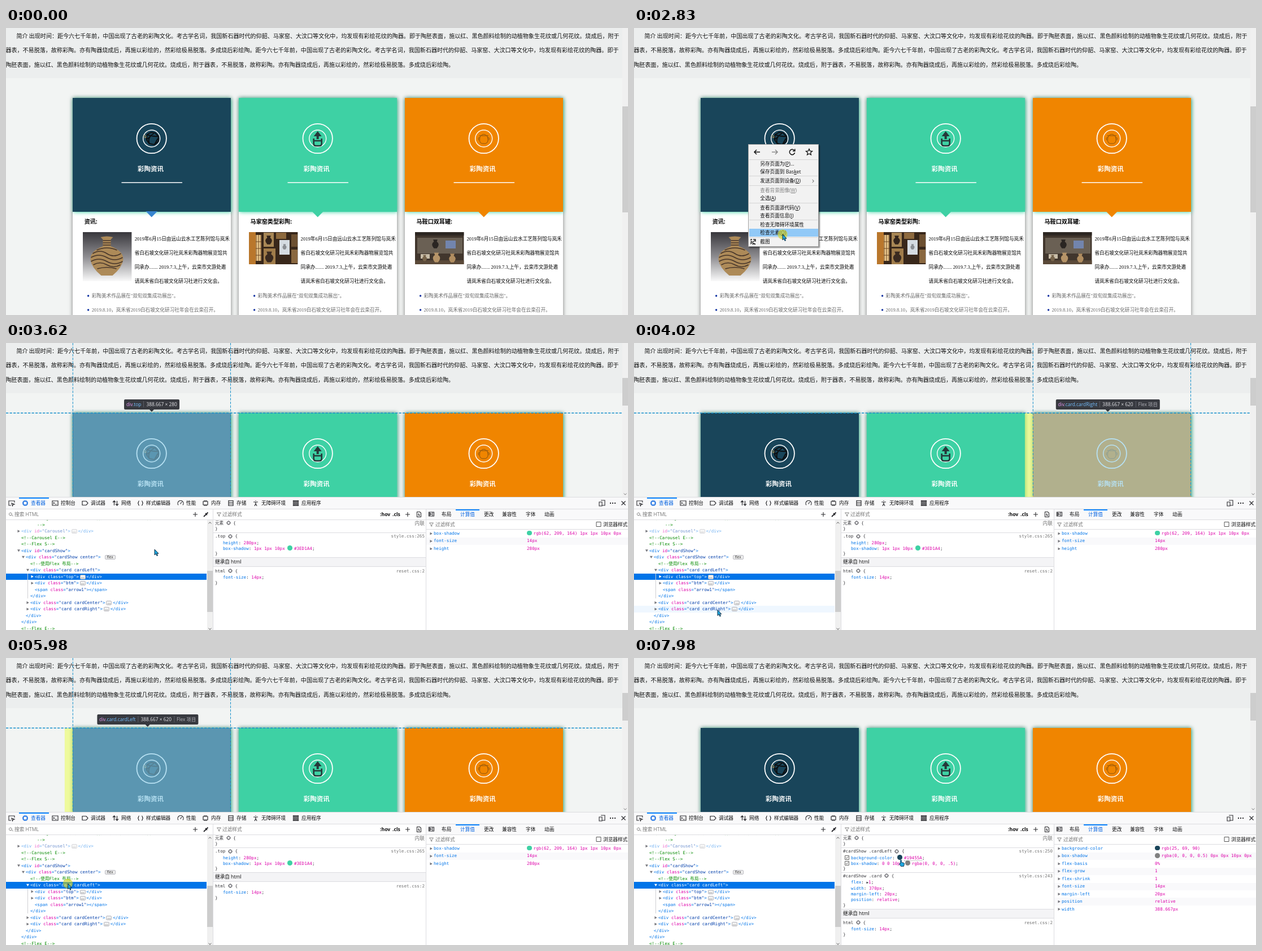
These frames come from a looping animation (1101x509 px, 8 s). An HTML page:

```html
<!DOCTYPE html>
<html lang="zh-CN">
<head>
<meta charset="utf-8">
<title>彩陶资讯</title>
<style>
html, body { margin: 0; width: 100%; height: 100%; overflow: hidden; background: #f2f4f3; }
[hidden] { display: none !important; }
#stage { position: absolute; left: 0; top: 0; width: 1101px; height: 509px; overflow: hidden;
  font: 8.64px "Open Sans", "Noto Sans CJK SC", sans-serif; color: #0c0c0d; text-spacing-trim: space-all; }
#stage div, #stage svg { position: absolute; }
.layer { left: 0; top: 0; width: 1101px; height: 509px; overflow: hidden; }
p { position: absolute; margin: 0; line-height: 12px; white-space: pre; }
i { font-style: normal; }
svg { fill: none; overflow: visible; }

.intro { font: 10.06px/12px "Noto Sans CJK SC", sans-serif; color: #111; }
.card { top: 124px; width: 279.8px; height: 446px; background: #fff; box-shadow: 0 0 7px rgba(0,0,0,.5); }
.head { width: 279.8px; height: 201.6px; background: var(--c); box-shadow: .7px .7px 7px #3ed1a4; }
.title { font-size: 11.52px; font-weight: 700; color: #fff; }
.sub { font-size: 10.08px; font-weight: 700; color: #000; }
.txt { font-family: "Liberation Serif", "Noto Sans CJK SC", serif; color: #000; }
.li { font-family: "Liberation Serif", "Noto Sans CJK SC", serif; color: #666; }

#menu { left: 202px; top: 206px; width: 123px; height: 180px; background: #f2f2f2;
  border: 1px solid #a3a3a3; box-shadow: 2px 2px 2px rgba(0,0,0,.45); }
#menu u { text-underline-offset: 1px; }
.hit { left: 1px; width: 122px; height: 14px; background: #91c9f7; }
.off { color: #7d7d7d; }
.rule { height: 1px; background: #d7d7db; }

.mono, .row p { font: 7.6px/12px "DejaVu Sans Mono", "Noto Sans CJK SC", monospace; color: #38383d; }
.t { color: #0074e8; } .a { color: #dd00a9; } .v { color: #003eaa; } .c { color: #058b00; }
.g { color: #737373; } .blue { color: #0060df; }
.row { left: 0; width: 355px; height: 11.5px; }
.row.hov { background: #eff7ff; }
.row.sel { background: #0074e8; }
.row.sel i { color: #fff; }
.row.sel em { background: #fff; }
em { position: absolute; width: 5px; height: 5px; background: #77777c; clip-path: polygon(10% 0, 95% 50%, 10% 100%); }
em.open { clip-path: polygon(0 10%, 100% 10%, 50% 95%); }
.dots, .flex { display: inline-block; box-sizing: border-box; height: 8px; margin: 0 1.8px; border: 1px solid #b9b9c0;
  border-radius: 2px; background: #eee; color: #333; font: 6px/5px "Open Sans", sans-serif; text-align: center; vertical-align: 0; }
.dots { width: 10px; font-size: 8px; line-height: 3px; }
.flex { margin-left: 7px; width: 19px; font-size: 6.6px; }
.sw { display: inline-block; width: 8.6px; height: 8.6px; margin-right: 3px; border-radius: 50%; vertical-align: -1.4px; }
#stage .gear { position: static; vertical-align: -1.5px; }
.tip { height: 18px; line-height: 18px; padding: 0 4px; border-radius: 2px; font-size: 8.4px; color: #e4e4e8;
  background: rgba(50,52,58,.97); white-space: pre; transform: translateX(-50%); }
.tip b { font-weight: 400; border-left: 1px solid #5c5e66; margin-left: 4px; padding-left: 4px; }
</style>
</head>
<body>
<div id="stage">
  <div id="page" class="layer"></div>
  <div id="over" class="layer" style="height:273px"></div>
  <div id="bar" style="left:1091px;top:0;width:10px;height:509px;background:#f0f0f0"><div id="thumb" style="width:10px;background:#cdcdcd"></div></div>
  <div id="menu"></div>
  <div id="panel" class="layer"></div>
  <svg id="cursor" width="1" height="1" style="left:0;top:0">
    <circle id="glow" r="8.7" fill="rgba(215,215,20,.58)"/>
    <path id="arrow" d="M0 0V10L2.4 7.8 4 11.5 5.6 10.8 4 7.3H7Z" fill="#1fa8e0" stroke="#0c2035" stroke-width=".9"/>
    <path id="hand" d="M-1 1Q0-1 1 1V4.5L5 5.3Q6 5.6 6 7L5 11.5H0L-3 7.5Q-3 6-1 7Z" fill="#1fa8e0" stroke="#0c2035" stroke-width=".8"/>
  </svg>
</div>
<script>
const $ = id => document.getElementById(id);
const text = (x, y, s, c = '') => `<p class="${c}" style="left:${x}px;top:${y - 6}px">${s}</p>`;
const box = (x, y, w, h, bg) => `<div style="left:${x}px;top:${y}px;width:${w}px;height:${h}px;background:${bg}"></div>`;
const path = (x, y, d, s = '#2a2a2e', w = 1.1, f = 'none') =>
  `<path transform="translate(${x} ${y})" d="${d}" stroke="${s}" stroke-width="${w}" fill="${f}"/>`;
const svg = (x, y, w, h, s) => `<svg style="left:${x}px;top:${y}px" width="${w}" height="${h}">${s}</svg>`;
const rect = (x, y, w, h, f) => `<rect x="${x}" y="${y}" width="${w}" height="${h}" fill="${f}"/>`;

// ---- page ----
const lead = '距今六七千年前，中国出现了古老的彩陶文化。考古学名词，我国新石器时代的仰韶、马家窑、大汶口等文化中，均发现有彩绘花纹的陶器。即于';
const made = '陶胚表面，施以红、黑色颜料绘制的动植物象生花纹或几何花纹。烧成后，附于';
const tail = '器表，不易脱落，故称彩陶。亦有陶器烧成后，再施以彩绘的，然彩绘极易脱落。多成烧后彩绘陶。';

const body = [
  '2019年6月15日由远山云水工艺陈列馆与岚禾',
  '省白石坡文化研习社岚禾彩陶器物展览馆共',
  '同承办....... 2019.7.3,上午，云栾市文游处邀',
  '请岚禾省白石坡文化研习社进行文化会。'
];
const news = ['彩陶美术作品展在"双旬双集成功展出"。', '2019.8.10，岚禾省2019白石坡文化研习社年会在云栾召开。'];

const jar = (x, y, s, f) => path(x, y, `M${-3*s}${-6*s}H${3*s}L${2*s} ${-3*s}Q${7*s} 0 ${2*s} ${6*s}H${-2*s}Q${-7*s} 0 ${-2*s} ${-3*s}Z`, 'none', 0, f);
const photos = [
  `<linearGradient id="wall" x2="0" y2="1"><stop stop-color="#38373c"/><stop offset=".5" stop-color="#8d8c90"/><stop offset="1" stop-color="#fafafa"/></linearGradient>` +
  rect(0, 0, 86.4, 87, 'url(#wall)') +
  path(42.5, 0, 'M-11 9Q0 6 11 9L7 13V25Q30 34 29 49Q27 63 10 77H-10Q-27 63-29 49Q-30 34-7 25V13Z', 'none', 0, '#ad8a58') +
  path(42.5, 0, 'M-7 15H7M-7 19H7M-7 23H7M-18 32Q0 24 18 32M-25 38Q-12 30 0 38T25 38M-28 45Q-14 37 0 45T28 45M-28 52Q-14 44 0 52T28 52M-24 58Q-12 51 0 58T24 58M-17 65Q0 60 17 65', '#46352a', 1.7),
  rect(0, 0, 86.4, 57, '#38271a') + rect(0, 0, 12, 57, '#b9772c') + rect(12, 5, 10, 46, '#e9c78c') +
  path(17, 5, 'M-4 0V46M0 0V46M4 0V46M-5 12H5M-5 24H5M-5 36H5', '#6b4520', 1) +
  rect(26, 1, 18, 25, '#a88755') + jar(35, 14, 1.3, '#33251c') + rect(48, 1, 18, 11, '#8e6a3e') +
  rect(26, 29, 21, 28, '#a07c4a') + jar(36, 44, 1.6, '#3a2a20') + rect(54, 14, 18, 26, '#d5dce2') +
  jar(63, 26, .8, '#8b8f94') + rect(75, 4, 11, 22, '#6d5031') + rect(75, 31, 11, 24, '#8a6840'),
  rect(0, 0, 86.4, 57, '#41362d') + rect(0, 0, 86.4, 6, '#2d2722') + rect(4, 10, 80, 28, '#6a6054') +
  rect(0, 50, 86.4, 7, '#5a4938') + rect(10, 39, 16, 8, '#c8bda8') + jar(36, 21, 1.3, '#2a2522') +
  rect(54, 15, 18, 14, '#7285ad') + jar(17, 46, .9, '#77644b') + jar(38, 45, 1.4, '#b69468') + jar(66, 46, 1.3, '#b08d60')
];
const marks = [
  path(139.7, 72, 'M-8-7L-1-11 6-10 12-4 12 5 5 11-4 9-9 2ZM-8-7Q2-3 12-4M-9 2L-3-3M-4 9Q-8-2 4-9M5 11L11 0', '#0c1013', 2) +
  path(129, 69, 'M-2-4L1-1M-4-2L0 1M-2 2L2 0', '#b99a55', 1),
  path(139.7, 72, 'M0-13L7-4H2V1H-2V-4H-7Z', 'none', 0, '#26383a') +
  path(139.7, 72, 'M-7 0V9Q-7 13-3 13H3Q7 13 7 9V0M-7 4H7', '#26383a', 2.6),
  path(139.7, 72, 'M-8-5H8M-5-5Q0-10 5-5M-6-5Q-10 7-3 9H3Q10 7 6-5M-7-1Q-11-3-9 3M7-1Q11-3 9 3', '#8a5310', 1)
];
const card = (i, color, tip, sub) => `<div class="card" style="left:${118.3 + 293.9 * i}px;--c:${color}"><div class="head"></div>` +
  svg(0, 0, 280, 385,
    `<circle cx="139.7" cy="72" r="26.2" stroke="#fff" stroke-width="1.8"/><circle cx="139.7" cy="72" r="15" stroke="#fff" stroke-width="1.4"/>` +
    marks[i] + path(86.5, 150.2, 'M0 0H107.5', '#fff', 1.5) +
    path(129.4, 201, 'M0 0H20.7L10.3 10.6Z', 'none', 0, tip) +
    [351, 376].map(y => `<circle cx="27.6" cy="${y}" r="1.7" fill="#0a2fa0"/>`).join('')) +
  svg(17.6, 238, 86.4, 87, photos[i]) +
  text(114.6, 125.6, '彩陶资讯', 'title') + text(20.4, 219, sub, 'sub') +
  body.map((s, k) => text(109.4, 249.8 + 25.2 * k, s, 'txt')).join('') +
  news.map((s, k) => text(33.4, 351 + 25.2 * k, s, 'li')).join('') + '</div>';

$('page').innerHTML = box(0, 0, 1091, 89, '#eceeee') +
  text(18.4, 14, '简介 出现时间：' + lead + made.slice(0, 0) + '陶胚表面，' + made.slice(5), 'intro') +
  text(-.6, 39.4, tail + lead, 'intro') + text(-.6, 64.6, made + tail, 'intro') +
  card(0, '#19455a', '#3684cf', '资讯:') + card(1, '#3ed1a4', '#3ed1a4', '马家窑类型彩陶:') +
  card(2, '#f08500', '#f08500', '马鞍口双耳罐:');

// ---- context menu ----
const items = [[241, '另存页面为(<u>P</u>)...'], [255, '保存页面到 Bas<u>k</u>et'], [271, '发送页面到设备(<u>D</u>)'],
  [288, '查看背景图像(<u>W</u>)', 'off'], [302, '全选(<u>A</u>)'], [318.5, '查看页面源代码(<u>V</u>)'], [332.5, '查看页面信息(<u>I</u>)'],
  [349, '检查无障碍环境属性'], [363, '检查元素(<u>Q</u>)'], [379, '截图']];
const back = 'M5 0H-5M-1-4L-5 0-1 4';
$('menu').innerHTML = '<div class="hit" id="hit"></div>' +
  [233, 262, 279, 310, 340, 371].map(y => box(1, y - 207, 121, 1, '#d5d5d5')).join('') +
  items.map(([y, s, c]) => text(20.3, y - 207, s, c)).join('') +
  svg(0, 0, 123, 180, path(15, 13, back, '#111', 1.5) + path(46, 13, 'M-5 0H5M1-4L5 0 1 4', '#8a8a8a', 1.5) +
    path(77, 13, 'M3.6-3A4.7 4.7 0 1 0 4.6 1M4.8-5.5V-1.8H1', '#111', 1.5) +
    path(107, 13, 'M0-5.5L1.6-1.8 5.5-1.5 2.5 1.2 3.4 5 0 3-3.4 5-2.5 1.2-5.5-1.5-1.6-1.8Z', '#111', 1.3) +
    path(114, 64.5, 'M-1.3-2.5L1.3 0-1.3 2.5', '#444', 1) +
    path(8, 172, 'M-4-2V-4H-2M0-4H4V0M-4 0V2M-5 4L4-3M-4-1L4 5M-2 4H4', '#222', 1.3));

// ---- developer tools ----
const tag = (n, a, v) => `<i class="t">&lt;${n}</i>` + (a ? ` <i class="a">${a}</i><i class="t">=</i><i class="v">"${v}"</i>` : '') + '<i class="t">&gt;</i>';
const end = n => `<i class="t">&lt;/${n}&gt;</i>`;
const note = s => `<i class="c">${s}</i>`;
const fold = (a, v) => tag('div', a, v) + '<span class="dots">…</span>' + end('div');
const rowTop = k => 316.7 + 11.52 * k;
const row = ([x, s, tw], k) => `<div class="row" style="top:${rowTop(k - 1) - 314}px">` +
  (tw ? `<em class="${tw}" style="left:${x - 7}px;top:3px"></em>` : '') + text(x, 5.8, s) + '</div>';
const tree = [
  [27, note('图片大小 imgSrc: 为了方便你迅速查看, 预览效果(为个人服务器)')], [55, note('--&gt;')],
  [27, `<span style="opacity:.55">${fold('id', 'Carousel')}</span>`, 'shut'],
  [27, note('&lt;!--Carousel E--&gt;')], [27, note('&lt;!--Flex S--&gt;')],
  [27, tag('div', 'id', 'cardShow'), 'open'],
  [35, tag('div', 'class', 'cardShow center') + '<span class="flex">flex</span>', 'open'],
  [43, note('&lt;!--使用Flex 布局--&gt;')],
  [43, tag('div', 'class', 'card cardLeft'), 'open'],
  [51, fold('class', 'top'), 'shut'], [51, fold('class', 'btm'), 'shut'],
  [51, tag('span', 'class', 'arrow1') + end('span')], [43, end('div')],
  [43, fold('class', 'card cardCenter'), 'shut'], [43, fold('class', 'card cardRight'), 'shut'],
  [35, end('div')], [27, end('div')], [27, note('&lt;!--Flex E--&gt;')]
];

const gear = '<svg class="gear" width="8" height="8"><circle cx="4" cy="4" r="2.7" stroke="#6a6a70" stroke-width="1.1"/><path d="M4 0V2.5M4 5.5V8M0 4H2.5M5.5 4H8" stroke="#6a6a70"/></svg>';
const sw = c => `<span class="sw" style="background:${c}"></span>`;
const sel = (y, s, src) => text(370, y, `${s} ${gear} {`, 'mono') + `<p class="mono g" style="right:360px;top:${y - 6}px">${src}</p>`;
const decl = (y, p, v) => text(384, y, `<i class="t">${p}</i>: <i class="a">${v}</i>;`, 'mono');
const shut = y => text(370, y, '}', 'mono');
const line = (x, y, w) => box(x, y, w, 1, '#dcdce0');
const inherit = y => box(367, y - 8, 376, 17, '#f4f4f6') + line(367, y - 8, 376) + line(367, y + 8, 376) + text(370, y, '继承自 html') +
  sel(y + 16.5, 'html', 'reset.css:2') + decl(y + 28, 'font-size', '14px') + shut(y + 38);
const tick = y => svg(373, y, 8, 8, rect(.5, .5, 7, 7, '#fff') + path(4, 4, 'M-3.5-3.5H3.5V3.5H-3.5ZM-2 0L-.5 1.8 2.2-1.8', '#555', .9));
const computed = rows => rows.map(([p, v], k) => {
  const y = 338 + 13.44 * k;
  return (k % 2 ? box(744, y - 6.7, 357, 13.4, '#f9f9fb') : '') + `<em style="left:750px;top:${y - 2.5}px"></em>` +
    text(757, y, `<i class="t">${p}</i>`, 'mono') + text(922, y, `<i class="a">${v}</i>`, 'mono');
}).join('');

const tabs = [[34, '查看器', 'M-3.2-3.2H3.2V3.2H-3.2ZM-1.2-5V-3M1.2-5V-3M-1.2 3V5M1.2 3V5M-5-1.2H-3M-5 1.2H-3M3-1.2H5M3 1.2H5'],
  [87, '控制台', 'M-5-4H5V4H-5ZM-3-1.5L-1.5 0-3 1.5M0 2H2.5'], [140, '调试器', 'M-5-3.5H2L5 0 2 3.5H-5Z'],
  [194, '网络', 'M-2.5 4V-4L-5-1.5M-2.5-4L0-1.5M2.5-4V4L0 1.5M2.5 4L5 1.5'],
  [238, '样式编辑器', 'M-2-4Q-3.5-4-3.5-2T-5 0Q-3.5 0-3.5 2T-2 4M2-4Q3.5-4 3.5-2T5 0Q3.5 0 3.5 2T2 4'],
  [309, '性能', 'M-4 3.5A5 5 0 1 1 4 3.5M-.5 1.5L2-2'],
  [353, '内存', 'M-4-3H4V3H-4ZM-2-5V-3M0-5V-3M2-5V-3M-2 3V5M0 3V5M2 3V5'],
  [398, '存储', 'M-4-4.5H4V4.5H-4ZM-4-1.5H4M-4 1.5H4'],
  [442, '无障碍环境', 'M-.6-4.5H.6M-4-2H4M0-2V1L-2 5M0 1L2 5'],
  [513, '应用程序', 'M-4.5-4.5H-2.5V-2.5H-4.5ZM-1-4.5H1V-2.5H-1ZM2.5-4.5H4.5V-2.5H2.5ZM-4.5-1H-2.5V1H-4.5ZM-1-1H1V1H-1ZM2.5-1H4.5V1H2.5ZM-4.5 2.5H-2.5V4.5H-4.5ZM-1 2.5H1V4.5H-1ZM2.5 2.5H4.5V4.5H2.5Z']];
const funnel = 'M-3.5-3H3.5L.8 .3V3.2L-.8 2.4V.3Z', plus = 'M-4 0H4M0-4V4', chev = 'M-2.5-1.2L0 1.2 2.5-1.2';
const side = [[771, '布局'], [804, '计算值', 'blue'], [846, '更改'], [878, '兼容性'], [920, '字体'], [953, '动画']];

$('bar').innerHTML += svg(0, 0, 10, 273, `<g id="chev">${path(5, 268, chev, '#777', 1)}</g>`);
$('panel').innerHTML = box(0, 273, 1101, 236, '#fff') + box(0, 273, 1101, 22, '#f9f9fa') + line(0, 273, 1101) + line(0, 294, 1101) +
  '<div id="tools" class="layer">' + box(23, 274, 53, 2, '#0a84ff') +
  box(744, 295, 357, 18, '#f9f9fa') + box(796, 295, 42, 1.5, '#0a84ff') + line(0, 313, 1101) + line(744, 330, 357) +
  tabs.map(([x, s], k) => text(x + 10, 284, s, k ? '' : 'blue')).join('') + side.map(a => text(a[0], 303.5, a[1], a[2])).join('') +
  text(15, 303.5, '搜索 HTML', 'g') + text(383, 303.5, '过滤样式', 'g') + text(760, 322, '过滤样式', 'g') + text(1057, 322, '浏览器样式') +
  text(662, 303.5, '<b>:hov</b>') + text(684, 303.5, '<b>.cls</b>') +
  svg(0, 0, 1101, 509, tabs.map(([x, , d], k) => path(x, 284, d, k ? '#2a2a2e' : '#0060df', 1.2)).join('') +
    path(10, 284, 'M5-1V-4H-5V4H-1M0 0L5 2 2.5 2.8 1.5 5Z') +
    path(8.5, 303.5, 'M1.5 1.2A2.4 2.4 0 1 1 1.6 1L4 3.8', '#777', 1) + path(335, 304, plus) + path(711, 304, plus) +
    path(354, 304, 'M-4 4L1-1M-1-2L2 1M1-1L3.5-3.5', '#2a2a2e', 1.8) + path(377, 304, funnel, '#777', .9) + path(753, 322, funnel, '#777', .9) +
    path(731, 304, 'M-3.5-4.5H1.5L3.5-2.5V4.5H-3.5ZM0-2L-1 1H1L0 3') + path(753, 303.5, 'M-4.5-3.5H4.5V3.5H-4.5ZM2-3.5V3.5M-3-2L0 0-3 2Z') +
    path(1049, 321.5, 'M-4-4H4V4H-4Z', '#555', 1) + path(1055, 284, 'M-2-5H5V4H0M-5-2H0V5H-5Z') +
    path(1074, 284, 'M-5 0H-3M-1 0H1M3 0H5', '#2a2a2e', 2) + path(1093, 284, 'M-3.5-3.5L3.5 3.5M3.5-3.5L-3.5 3.5', '#2a2a2e', 1.2)) + '</div>' +
  '<div id="tree" class="layer" style="top:314px;height:195px">' + tree.map(row).join('') +
  box(38, 95, 1, 44, '#d0d0d4') + box(356, 0, 10, 195, '#f0f0f0') + box(356, 90, 10, 73, '#cdcdcd') +
  svg(0, 0, 366, 195, path(361, 5, 'M-2.5 1.2L0-1.2 2.5 1.2', '#555', 1) + path(361, 193, chev, '#555', 1)) + '</div>' +
  '<div id="detail" class="layer">' + box(366, 295, 1, 214, '#dcdce0') + box(743, 295, 1, 214, '#dcdce0') +
  text(370, 319.5, `元素 ${gear} {`, 'mono') + text(723.5, 319.5, '内联', 'g') + shut(330) + line(367, 336, 376) +
  '<div id="first" class="layer">' + sel(343, '.top', 'style.css:265') + decl(354.5, 'height', '280px') +
  decl(364.7, 'box-shadow', `1px 1px 10px ${sw('#3ed1a4')}#3ED1A4`) + shut(374) + inherit(388) +
  computed([['box-shadow', sw('#3ed1a4') + 'rgb(62, 209, 164) 1px 1px 10px 0px'], ['font-size', '14px'], ['height', '280px']]) + '</div>' +
  '<div id="second" class="layer">' + sel(343, '#cardShow .cardLeft', 'style.css:250') +
  decl(354.5, 'background-color', `${sw('#19455a')}<span style="border-bottom:1px dotted #999">#19455A</span>`) +
  decl(364.7, 'box-shadow', `0 0 10px ${sw('#808080')}rgba(0, 0, 0, .5)`) + shut(374) + line(367, 380, 376) +
  `<div id="ticks">${tick(350)}${tick(360)}</div>` + sel(386.5, '#cardShow .card', 'style.css:243') +
  text(384, 398, '<i class="t">flex</i>: <span style="font-size:6px">▶</span><i class="a">1</i>;', 'mono') +
  decl(408.5, 'width', '370px') + decl(418.7, 'margin-left', '20px') + decl(428.7, 'position', 'relative') + shut(438.5) + inherit(453) +
  computed([['background-color', sw('#19455a') + 'rgb(25, 69, 90)'], ['box-shadow', sw('#808080') + 'rgba(0, 0, 0, 0.5) 0px 0px 10px 0px'],
    ['flex-basis', '0%'], ['flex-grow', '1'], ['flex-shrink', '1'], ['font-size', '14px'], ['margin-left', '20px'],
    ['position', 'relative'], ['width', '388.667px']]) + '</div></div>';
const rows = [...document.querySelectorAll('.row')].slice(1);

// ---- element highlighter: tag, class, size, left, right, margin, below the fold ----
const cardBox = (name, i) => ['div', '.card.' + name, '388.667 × 620', 118.3 + 294 * i, 397.5 + 294 * i, 14.4];
const boxes = {
  5: ['div', '.cardShow.center', '1206 × 620', 104, 986, 0], 7: cardBox('cardLeft', 0), 8: ['div', '.top', '388.667 × 280', 118.3, 397.5, 0],
  9: ['div', '.btm', '388.667 × 340', 118.3, 397.5, 0, 1], 10: ['span', '.arrow1', '28.8 × 14.4', 257.8, 257.8, 0, 1],
  11: cardBox('cardLeft', 0), 12: cardBox('cardCenter', 1), 13: cardBox('cardRight', 2)
};
let shown;
function highlight(k) {
  if (k === shown) return;
  shown = k;
  const b = boxes[k];
  if (!b) return void ($('over').innerHTML = '');
  const [n, cls, size, l, r, m, low] = b, mid = (l - m + r) / 2, thin = l < r;
  const dash = (d, w) => `<path d="${d}" stroke="#1790cb" stroke-width="${w}" stroke-dasharray="4.3 2.2"/>`;
  $('over').innerHTML = svg(0, 0, 1091, 273,
    (low ? '' : rect(l, 124, r - l, 150, 'rgba(135,206,235,.6)') + rect(l - m, 124, m, 150, 'rgba(237,255,100,.6)') +
      dash('M0 124.3H1091', 1.5) + path(mid, 117.5, 'M-4.5 0H4.5L0 4.5Z', 'none', 0, '#32343a')) +
    (thin ? dash(`M${l} 0V273M${r} 0V273`, 1) : dash(`M${l} 0V273`, 2))) +
    `<div class="tip" style="left:${mid}px;top:${low ? 253 : 100}px;${low ? 'background:rgba(50,52,58,.8)' : ''}">` +
    `<span style="color:#e59cf2">${n}</span><span style="color:#75bfff">${cls}</span><b>${size}</b>` +
    (m ? '<b style="color:#b1b1b8">Flex 项目</b>' : '') + '</div>';
}

// ---- timeline: start, end, steps, control point, target ----
const moves = [[200, 970, 11, 420, 50, 253, 194], [1050, 1520, 7, 245, 197, 201, 206], [2070, 2450, 6, 245, 290, 263, 366],
  [3850, 4170, 5, 170, 538, 90, 435], [4400, 5180, 11, 84, 425, 109.5, 400], [6610, 7360, 11, 290, 402, 473, 355],
  [7440, 7441, 1, 473, 355, 474, 356], [7760, 7980, 4, 473, 357, 472.5, 358]];
function pointer(t) {
  let x = 613, y = 1;
  for (const [t0, t1, n, cx, cy, ex, ey] of moves) {
    if (t < t0) break;
    const k = Math.min(n - 1, Math.floor((t - t0) / (t1 - t0) * (n - 1) + .01));
    let u = (k + 1) / n;
    u *= u * (3 - 2 * u);
    const v = 1 - u;
    x = v * v * x + 2 * u * v * cx + u * u * ex;
    y = v * v * y + 2 * u * v * cy + u * u * ey;
  }
  return [x, y];
}
const show = (id, on) => { $(id).style.display = on ? '' : 'none'; };
const within = (t, a, b) => t >= a && t < b;

function draw(t) {
  const [x, y] = pointer(t), open = t >= 3150;
  show('cursor', t >= 200);
  $('cursor').style.transform = `translate(${x}px,${y}px)`;
  show('glow', within(t, 1750, 1920) || within(t, 2830, 3000) || within(t, 5980, 6050));
  show('arrow', t < 7440);
  show('hand', t >= 7440);

  show('menu', within(t, 1920, 3000));
  const item = t >= 2070 && items.find(i => Math.abs(i[0] - y) < 7 && !i[2]);
  show('hit', item);
  if (item) $('hit').style.top = item[0] - 214 + 'px';

  show('panel', open);
  show('chev', open);
  show('tools', t >= 3230);
  show('tree', t >= 3390);
  show('detail', t >= 3470);
  $('thumb').style.top = (open ? 62 : 139) + 'px';
  $('thumb').style.height = (open ? 49 : 188) + 'px';
  show('first', t < 6050);
  show('second', t >= 6050);
  show('ticks', x > 366);

  const hov = t >= 3850 && x < 355 ? Math.floor((y - rowTop(0)) / 11.52) : -1;
  const picked = t < 5980 ? 8 : 7;
  rows.forEach((r, k) => { r.className = 'row' + (k === picked ? ' sel' : k === hov ? ' hov' : ''); });
  highlight(within(t, 3540, 3850) ? 8 : hov);
}
function tickFrame() {
  draw(performance.now() % 8000);
  requestAnimationFrame(tickFrame);
}
tickFrame();
</script>
</body>
</html>
```
